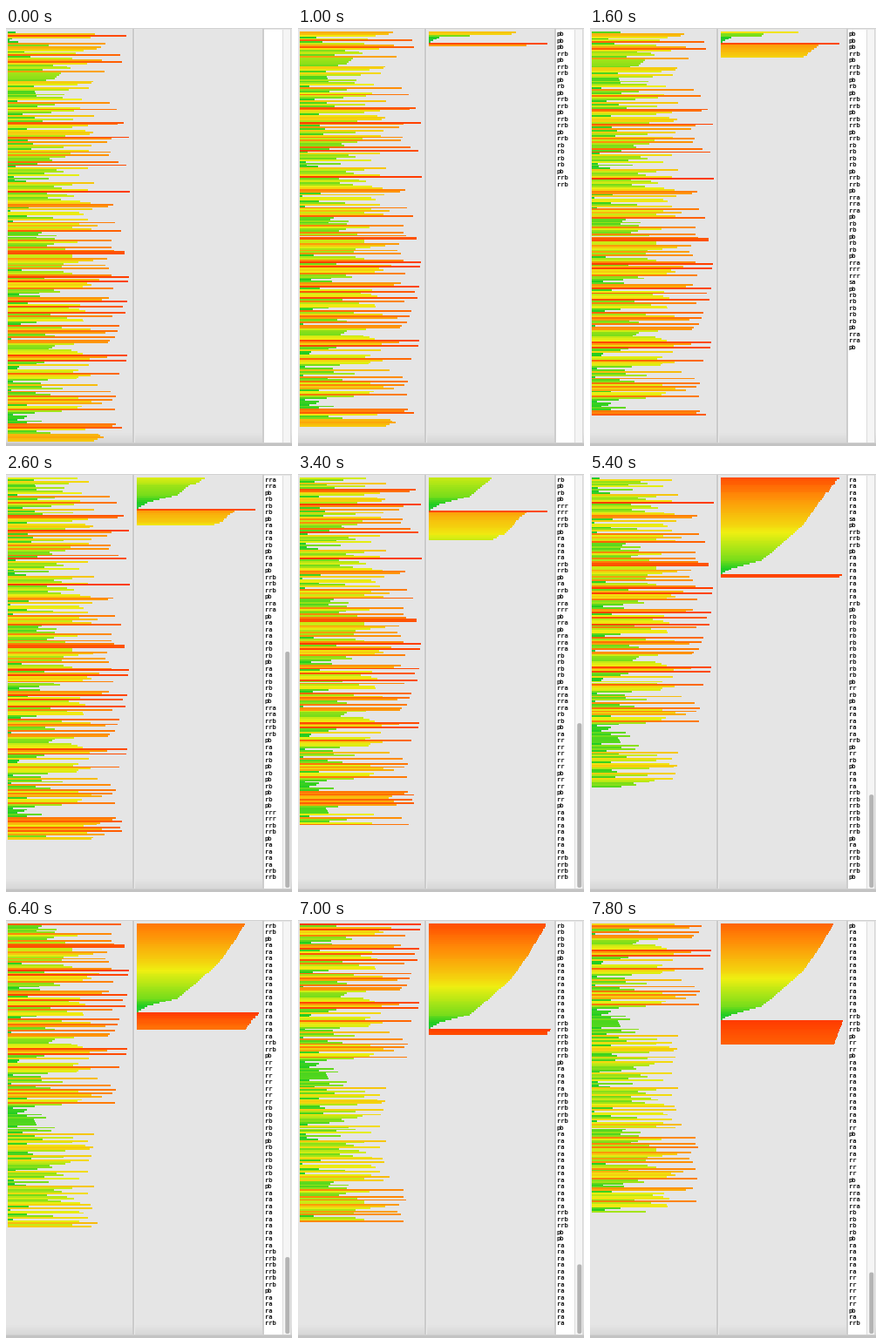
Animation of 328x480 px, one loop 8000 ms. Source, as a matplotlib script:

```python
import numpy as np
import matplotlib.pyplot as plt
from matplotlib.animation import FuncAnimation
from matplotlib.collections import PolyCollection
from matplotlib.colors import hsv_to_rgb
from matplotlib.patches import FancyBboxPatch, Rectangle

W, H, DPI = 328, 480, 100
COUNT = 250
TOP, PITCH, LONGEST = 4, 471 / COUNT, 140
ROWS, ROW_H = 62, 7.49
FRAMES, INTERVAL = 40, 200

# the sorting commands, as they scroll by in the list
PROGRAM = """
pb*3 rrb pb rrb*2 pb rb pb rrb*2 pb rrb*2 pb rrb rb*4 pb rrb*2 pb rra*3 pb
rb*2 pb rb*2 pb rra rrr*2 sa pb rb*5 pb rra*2 pb
rb*3 pb ra*3 rb pb ra*2 pb rrb*3 pb rra*2 pb ra*4 rb*2 pb ra*2 rb*3 pb
rra*2 rrb*3 pb ra*2 rb pb rb pb
rb pb rb pb rrr*2 rrb*2 pb ra*4 rrb*2 pb ra rrb pb rra rrr pb rra pb rra*3
rb*4 pb rra*4 rb*2 pb ra rr*5 pb rr*2 pb rr pb ra*7 rrb*4
rrb pb rrr*2 pb rra*5 pb rra rrr*9 pb rrr rrb pb ra rrb pb ra rrb pb rra rrr
pb*2 rra pb rra*2 rb*3 pb rb pb ra*5 rr pb ra*2 rrb*2 pb ra*2
ra*4 sa pb rrb*3 pb ra*7 rrb pb rb*10 pb rr rb pb ra*5 rrb pb rr rb pb ra*3
rrb*7 pb ra rrb*4 pb
ra*15 rrb*2 pb rr*7 rb*5 pb rb*6 pb ra*9 rrb*6 pb ra*4 rrb
rrb*4 pb ra*12 rrb*3 pb
pb ra*13 rrb*3 pb rr*2 pb ra*10 rr pb ra*3 rr*3 pb rra*4 rb*4 pb ra*5 rr*5
pb ra rrb
"""


def parse(program):
    ops = []
    for word in program.split():
        name, _, times = word.partition("*")
        ops += [name] * int(times or 1)
    return ops


def rotate(stack, op):
    """Apply ra/rb/rr (up) or rra/rrb/rrr (down) to one stack."""
    if len(stack) > 1:
        if len(op) == 2:
            stack.append(stack.pop(0))
        else:
            stack.insert(0, stack.pop())


def run(ops):
    a, b = list(range(COUNT)), []
    for op in ops:
        if op == "pb":
            b.insert(0, a.pop(0))
        elif op == "sa":
            a[0], a[1] = a[1], a[0]
        else:
            if op[-1] in "ar":
                rotate(a, op)
            if op[-1] in "br":
                rotate(b, op)
    return a, b


OPS = parse(PROGRAM)
MAX_AT = 59  # where the longest bar of the right stack ends up


def make_lengths():
    """Right stack sorted along a curve, left stack random below a cap."""
    rng = np.random.default_rng(7)
    lengths = np.zeros(COUNT)
    a, b = run(OPS)
    cap = np.interp(range(len(a)), [50, 51, 63, 64, 118, 122],
                    [137, 45, 45, 102, 102, 124])
    lengths[a] = 2 + (cap - 2) * rng.random(len(a)) ** 0.8
    rank = (np.arange(len(b)) - MAX_AT) % len(b)
    lengths[b] = np.interp(rank, [0, 14, 28, 43, 55, 65, 70, 73],
                           [140, 130, 115, 95, 70, 47, 12, 2])
    return lengths


def bar_colors(share):
    """Green for short bars over yellow to red for long ones."""
    hue = (130 - 116 * share) / 360
    value = np.clip(0.78 + 0.22 * share / 0.85, 0, 1)
    return hsv_to_rgb(np.column_stack([hue, 0.82 + 0.18 * share, value]))


LENGTHS = make_lengths()
COLORS = bar_colors(LENGTHS / LONGEST)


def ops_done(step):
    if step < 6:
        return round(49 * step / 6)
    return int(49.05 + 11.84 * (step - 6))


fig = plt.figure(figsize=(W / DPI, H / DPI), dpi=DPI, facecolor="#e5e5e5")
ax = fig.add_axes([0, 0, 1, 1])
ax.axis("off")


def box(x, y, w, h, color):
    ax.add_patch(Rectangle((x, y), w, h, facecolor=color, linewidth=0))


# soft shade above the bottom edge
ax.imshow(np.linspace(229, 215, 12)[:, None], cmap="gray", vmin=0, vmax=255,
          extent=(0, W, 476, 464), aspect="auto", zorder=0)
ax.set_xlim(0, W)
ax.set_ylim(H, 0)

box(0, 0, W, 1, "#d2d2d2")
box(145, 1, 2, 476, "#cbcbcb")
box(147, 1, 1, 476, "#eaeaea")
box(294, 1, 2, 476, "#cdcdcd")
box(296, 2, 21, 474, "#ffffff")
box(317, 2, 1, 474, "#dcdcdc")
box(318, 2, 8, 474, "#f5f5f5")
box(326, 1, 1, 476, "#d8d8d8")
box(0, 476, W, 1, "#d0d0d0")
box(0, 477, W, 3, "#c3c3c3")

bars = PolyCollection([], linewidths=0, antialiaseds=False)
ax.add_collection(bars)
thumb = FancyBboxPatch((320.3, 300), 5, 175, facecolor="#b4b4b4", linewidth=0,
                       boxstyle="round,pad=0,rounding_size=2")
ax.add_patch(thumb)
lines = [ax.text(296.8, 0, "", family="DejaVu Sans Mono", size=5.1,
                 weight="bold", color="#1c1c1c", va="baseline")
         for _ in range(ROWS)]


def stack_bars(x, stack):
    quads = []
    for i, item in enumerate(stack):
        y0 = TOP + i * PITCH
        y1, x1 = y0 + PITCH, x + LENGTHS[item]
        quads.append([(x, y0), (x1, y0), (x1, y1), (x, y1)])
    return quads


def draw(frame):
    done = ops_done(max(0, frame - 2))
    a, b = run(OPS[:done])
    bars.set_verts(stack_bars(2, a) + stack_bars(150, b))
    bars.set_facecolor(COLORS[a + b])

    scrolled = done > ROWS
    shown = OPS[max(0, done - ROWS):done]
    first = 8.6 if scrolled else 9.4
    for i, line in enumerate(lines):
        line.set_text(shown[i] if i < len(shown) else "")
        line.set_y(first + i * ROW_H)

    thumb.set_visible(scrolled)
    if scrolled:
        y = 3 + 472 * (1 - ROWS / done)
        thumb.set_bounds(320.3, y, 5, 475 - y)
    return [bars, thumb, *lines]


anim = FuncAnimation(fig, draw, frames=FRAMES, interval=INTERVAL,
                     init_func=lambda: draw(0), repeat=True, repeat_delay=0,
                     blit=False)
plt.show()
```
